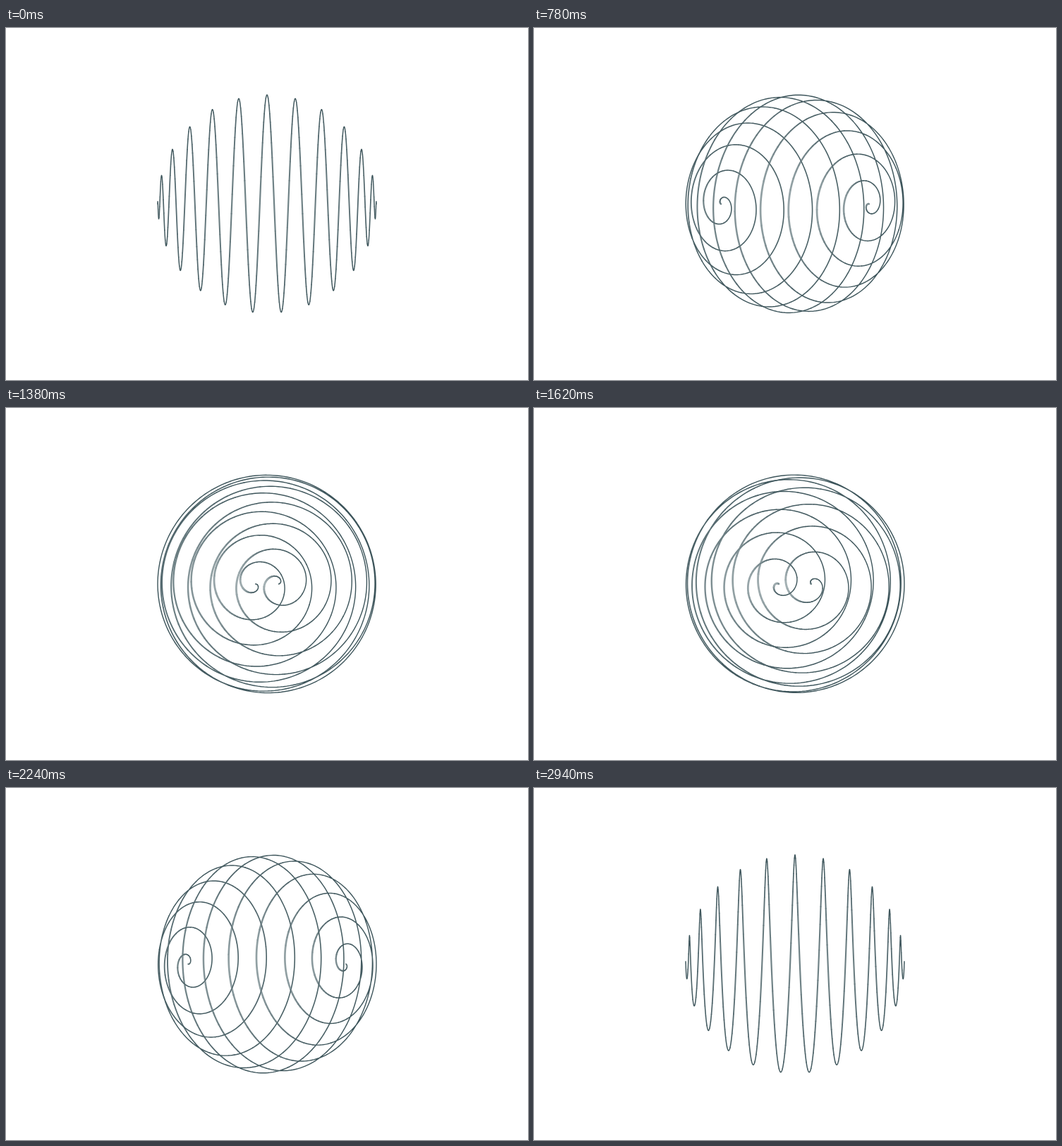
These frames come from a looping animation (740 px wide and 500 px high, 2960 ms). An HTML page with a canvas:

```html
<!DOCTYPE html>
<html lang="en">
<head>
<meta charset="utf-8">
<title>Spherical spiral</title>
<style>
html, body { margin: 0; width: 100%; height: 100%; overflow: hidden; background: #fff; }
canvas { display: block; }
</style>
</head>
<body>
<canvas id="stage" width="740" height="500"></canvas>
<script>
const ctx = document.getElementById('stage').getContext('2d');
const LOOP = 2960, STEP = 20;
const CX = 370, CY = 250, R = 155;
const TURNS = 24, SEGMENTS = 2400, SHADES = 16;
const DARK = [60, 84, 90], PALE = [164, 177, 180];

const mix = (a, b, k) => a + (b - a) * k;
const shade = k => 'rgb(' + DARK.map((c, i) => Math.round(mix(c, PALE[i], k))).join(',') + ')';

// Point on the spiral for a half turn about the vertical axis, with its softness:
// steep strokes far from the outline are wide and pale, most of all on the left
function point(theta, turn) {
  const c = Math.cos(turn), s = Math.sin(turn);
  const phi = TURNS * theta + 5 * Math.PI * (1 - c);
  const along = Math.cos(theta), r = Math.sin(theta);
  const steep = Math.sin(phi), side = r * steep;
  const z = along * s + side * c;
  const left = (1 - steep * s) / 2;
  return {
    x: CX + R * (side * s - along * c),
    y: CY - R * r * Math.cos(phi),
    soft: Math.abs(z * steep) * left
  };
}

function draw(time) {
  const turn = Math.PI * time / LOOP;
  const paths = Array.from({ length: SHADES + 1 }, () => new Path2D());
  let a = point(0, turn);
  for (let i = 1; i <= SEGMENTS; i++) {
    const b = point(Math.PI * i / SEGMENTS, turn);
    const path = paths[Math.round((a.soft + b.soft) / 2 * SHADES)];
    path.moveTo(a.x, a.y);
    path.lineTo(b.x, b.y);
    a = b;
  }

  ctx.globalCompositeOperation = 'source-over';
  ctx.fillStyle = '#fff';
  ctx.fillRect(0, 0, 740, 500);
  ctx.globalCompositeOperation = 'darken';
  ctx.lineCap = 'round';
  paths.forEach((path, i) => {
    const k = i / SHADES;
    ctx.strokeStyle = shade(k);
    ctx.lineWidth = mix(1.4, 3, k);
    ctx.stroke(path);
  });
}

const start = performance.now();
function tick() {
  const t = (performance.now() - start) % LOOP;
  draw(Math.floor(t / STEP) * STEP);
  requestAnimationFrame(tick);
}
tick();
</script>
</body>
</html>
```
